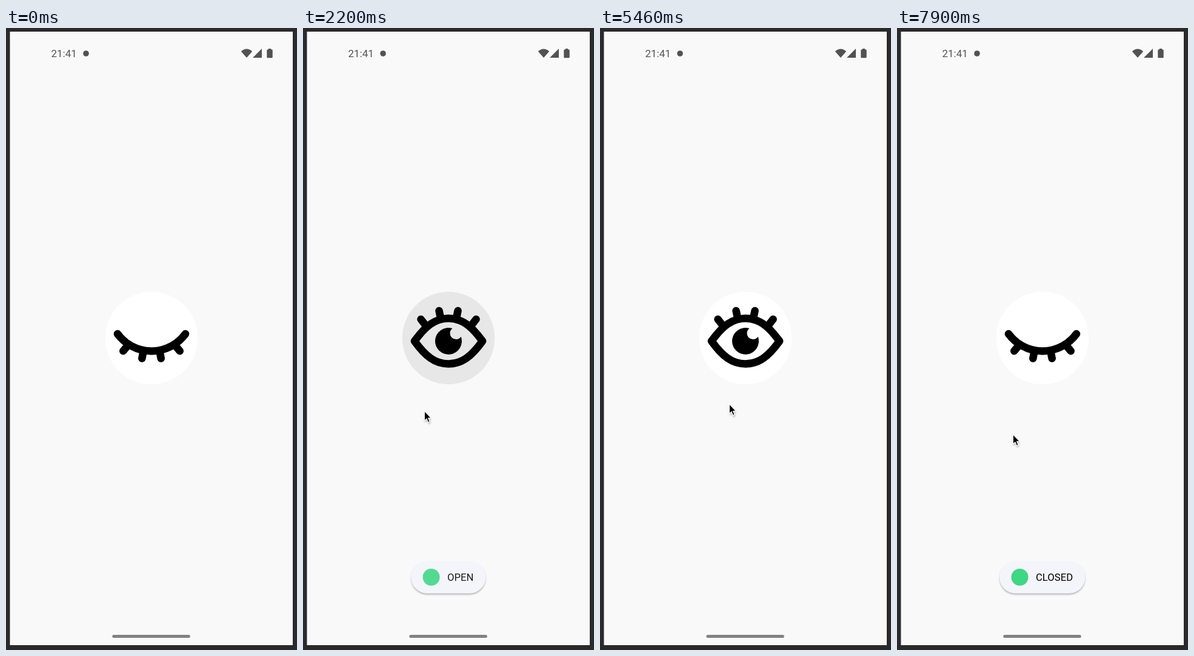
These frames come from a looping animation (480 by 1025 pixels, 8 s). An HTML page:

```html
<!DOCTYPE html>
<html lang="en">
<head>
<meta charset="utf-8">
<title>Eye toggle</title>
<style>
  html, body { margin: 0; width: 100%; height: 100%; overflow: hidden; background: #2a2a2c; }
  svg { display: block; width: 480px; height: 1025px; }
  text { font-family: Roboto, Arial, sans-serif; }
  .eye { fill: none; stroke: #000; stroke-width: 12.6; stroke-linecap: round; stroke-linejoin: round; }
  .blur { filter: blur(1.8px); }
</style>
</head>
<body>
<svg viewBox="0 0 480 1025">
  <clipPath id="disc"><circle cx="240" cy="511" r="76.3"/></clipPath>
  <rect x="6.5" y="6" width="466.5" height="1011" fill="#f9f9f9"/>

  <g fill="#525252">
    <text x="74.5" y="48.3" font-size="17">21:41</text>
    <circle cx="132" cy="42" r="4.8"/>
    <path d="M387.8 38.6Q397 30.6 406.200 38.600L397 49ZM422 34V49H407Z"/>
    <rect x="430.3" y="35.500" width="9.400" height="13.700" rx="1.300"/>
    <rect x="432.800" y="34" width="4.400" height="3"/>
  </g>
  <rect x="175.300" y="1000" width="128.500" height="5" rx="2.500" fill="#828282"/>

  <circle cx="240" cy="511" r="76.3" fill="#fff"/>
  <g clip-path="url(#disc)"><circle id="ripple"/></g>

  <g id="closed" class="eye">
    <path d="M184 504A69.300 69.300 0 0 0 296 504"/>
    <path d="M201 523L193.300 532.300M226.500 533L224.300 544.500M253.500 533L255.700 544.500M279 523L286.700 532.300"/>
  </g>
  <g id="open">
    <g class="eye">
      <path d="M184 516C202 491 218 478.500 240 478.500S278 491 296 516C278 541 262 553.500 240 553.500S202 541 184 516Z"/>
      <path d="M201.500 489L194.500 480M227 478L224.500 466M253 478L255.500 466M278.500 489L285.500 480"/>
    </g>
    <path d="M246.500 495A22 22 0 1 0 260.700 508.700A10 10 0 1 1 246.500 495Z"/>
  </g>

  <g id="toast">
    <rect id="shadow" class="blur" y="881" height="52.500" rx="26"/>
    <rect id="pill" y="878.300" height="53.400" rx="26.700" fill="#f4f4fb"/>
    <g id="content">
      <circle id="badge" cy="905" r="14" fill="#3fd684"/>
      <text id="label" y="911" font-size="16.700" fill="#000"></text>
    </g>
  </g>

  <g id="cursor">
    <path class="blur" d="M1 3V20L5 17L8 23L11 21L9 15H13Z" opacity=".28"/>
    <path d="M.8 1.200V17.300L4.400 13.900L7 19.900L9.700 18.700L7.200 12.900H12Z" stroke="#fff" stroke-width="1.200"/>
  </g>
</svg>
<script>
const LOOP = 8000;
const $ = id => document.getElementById(id);
const set = (id, attrs) => {
  for (const k in attrs) $(id).setAttribute(k, attrs[k]);
};
const ramp = (t, start, length) => Math.min(1, Math.max(0, (t - start) / length));
const mix = (a, b, s) => a + (b - a) * s;

const smooth = s => s * s * (3 - 2 * s);
const easeIn = s => s * s;
const easeOut = s => 1 - (1 - s) ** 2;

// time, x, y, easing towards this point
const path = [
  [340, -14, 918],
  [1040, 218.5, 541.5, easeOut],
  [1160, 218.5, 541.5, smooth],
  [1240, 224.5, 534.5, smooth],
  [1870, 224.5, 534.5, smooth],
  [2200, 199.5, 630, easeIn],
  [2480, 194.5, 668.5, easeOut],
  [5160, 194.5, 668.5, smooth],
  [5900, 244.5, 529.5, smooth],
  [5980, 244.5, 529.5, smooth],
  [6080, 244.5, 528, smooth],
  [6360, 244.5, 528, smooth],
  [6960, 189.5, 668.5, smooth],
  [7140, 189.5, 668.5, smooth],
  [7160, 190.5, 668.5, smooth]
];

const taps = [
  { up: 1840, x: 225, y: 535, label: 'OPEN', badge: 211.5, width: 123.5, hide: 4500 },
  { up: 6320, x: 245, y: 528, label: 'CLOSED', badge: 202.5, width: 141.5, hide: Infinity }
];

function drawCursor(t) {
  let i = path.findIndex(p => p[0] > t);
  if (i < 0) i = path.length;
  const a = path[Math.max(0, i - 1)], b = path[i] || a;
  const s = b === a ? 0 : b[3] ? b[3](ramp(t, a[0], b[0] - a[0])) : 0;
  set('cursor', { transform: `translate(${mix(a[1], b[1], s)} ${mix(a[2], b[2], s)})` });
}

function drawRipple(t, tap) {
  const down = tap.up - 80;
  const alpha = ramp(t, down, 80) * (1 - ramp(t, down + 480, 370));
  set('ripple', {
    cx: tap.x, cy: tap.y,
    r: mix(25, 115, easeOut(ramp(t, down, 240))),
    opacity: 0.094 * alpha
  });
}

function drawToast(t, tap) {
  const start = tap.up + 60, end = tap.hide;
  const left = tap.badge - 33.5;
  const grow = easeOut(ramp(t, start, 333)) - easeIn(ramp(t, end, 380));
  const scale = mix(0.9, 1, grow);
  $('label').textContent = tap.label;
  set('label', { x: tap.badge + 26.5 });
  set('badge', { cx: tap.badge });
  set('pill', { x: left, width: tap.width });
  set('shadow', { x: left + 0.5, width: tap.width - 1, opacity: 0.3 * (1 - ramp(t, end + 230, 60)) });
  set('content', { opacity: ramp(t, start + 50, 283) * (1 - ramp(t, end, 250)) });
  set('toast', {
    opacity: ramp(t, start, 66) * (1 - ramp(t, end + 360, 100)),
    transform: `translate(240 905) scale(${scale}) translate(-240 -905)`
  });
}

function draw(now) {
  const t = now % LOOP;
  const tap = taps[t < taps[1].up - 80 ? 0 : 1];
  const isOpen = t >= taps[0].up && t < taps[1].up;
  set('open', { opacity: +isOpen });
  set('closed', { opacity: +!isOpen });
  drawRipple(t, tap);
  drawToast(t, tap);
  drawCursor(t);
}

let begin;
function tick(now) {
  begin ??= now;
  draw(now - begin);
  requestAnimationFrame(tick);
}
draw(0);
requestAnimationFrame(tick);
</script>
</body>
</html>
```
